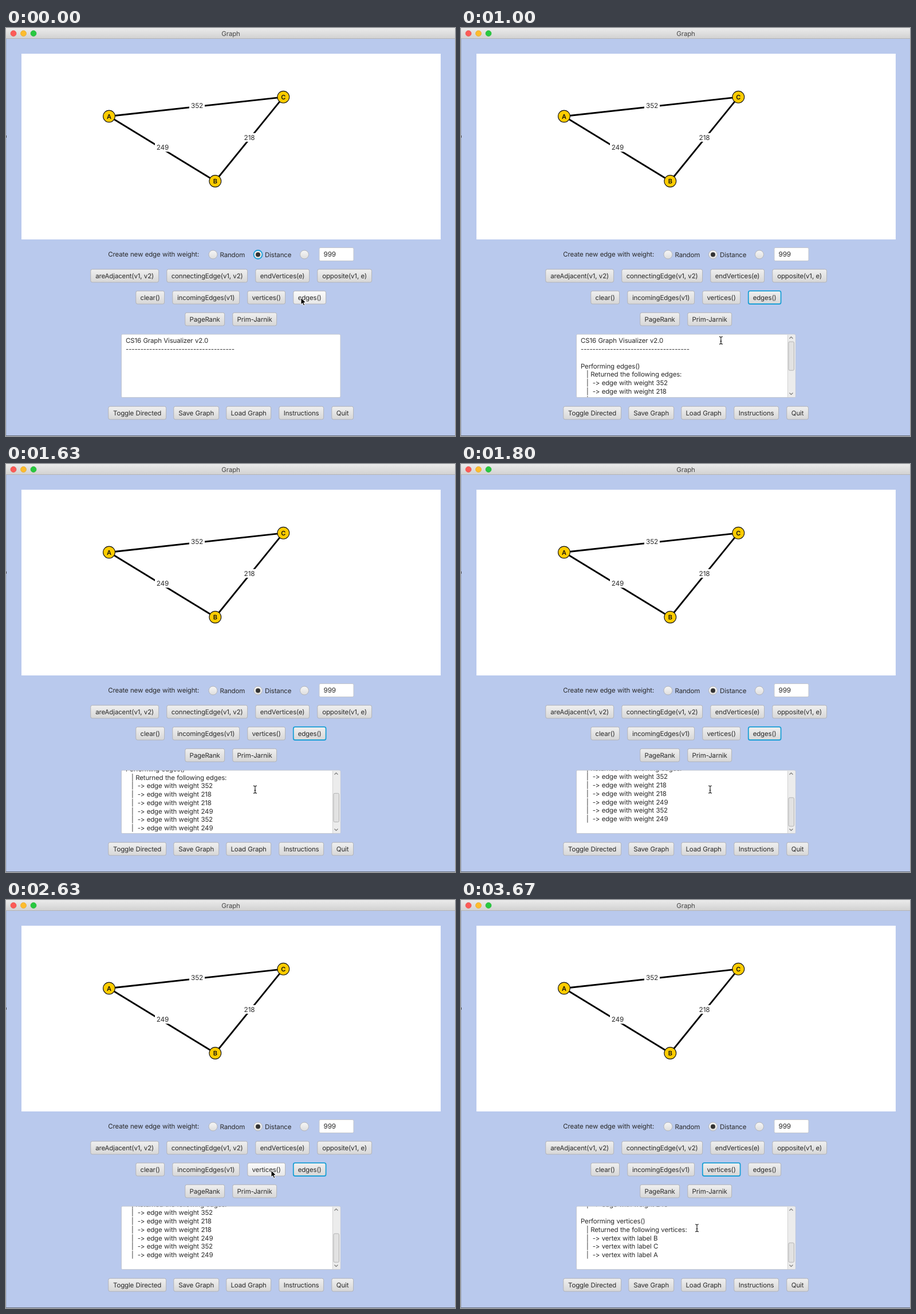
Animation of 784 by 714 pixels, one loop 3710 ms. Source, as an HTML page with a canvas:

```html
<!DOCTYPE html>
<html lang="en">
<head>
<meta charset="utf-8">
<title>Graph</title>
<style>
  html, body { margin: 0; width: 100%; height: 100%; overflow: hidden; background: #b9c9ed; }
  canvas { display: block; }
</style>
</head>
<body>
<canvas id="stage" width="784" height="714"></canvas>
<script>
const ctx = document.getElementById('stage').getContext('2d');
const LOOP = 3710, LINE = 14.75, INK = '#2a2a2a', FOCUS = '#1a9fd6';
const FIRST_PRESS = 370, FIRST_OUTPUT = 430, SECOND_PRESS = 2870, SECOND_OUTPUT = 2930;

// label, left, right, top
const buttons = [
  ['areAdjacent(v1, v2)', 148, 267, 422], ['connectingEdge(v1, v2)', 281, 422, 422],
  ['endVertices(e)', 436, 530, 422], ['opposite(v1, e)', 544, 639, 422],
  ['clear()', 227, 277, 460], ['incomingEdges(v1)', 291, 408, 460],
  ['vertices()', 422, 488, 460], ['edges()', 502, 559, 460],
  ['PageRank', 313, 382, 498], ['Prim-Jarnik', 396, 473, 498],
  ['Toggle Directed', 179, 280, 662], ['Save Graph', 293, 372, 662],
  ['Load Graph', 385, 463, 662], ['Instructions', 477, 555, 662], ['Quit', 569, 607, 662]
];
const nodes = { A: [180, 154.5], B: [365.3, 268], C: [484.3, 120.8] };
// ends, weight, label centre
const edges = [['A', 'C', 352, 333.5, 135.5], ['A', 'B', 249, 273.5, 209], ['B', 'C', 218, 425, 191.5]];

const header = ['CS16 Graph Visualizer v2.0', '-'.repeat(37)];
const report = (call, kind, items) => ['', `Performing ${call}()`, `   | Returned the following ${call}:`,
  ...items.map(item => `   |  -> ${kind} ${item}`)];
const edgeReport = report('edges', 'edge with weight', [352, 218, 218, 249, 352, 249]);
const vertexReport = report('vertices', 'vertex with label', ['B', 'C', 'A']);

// time, x, y of the pointer
const path = [
  [200, 515, 472], [480, 511.5, 474.5], [700, 511.5, 474.5], [1150, 434, 571.5], [1330, 434, 571.5],
  [1700, 435, 569.5], [2300, 435, 569.5], [2600, 463, 473], [2760, 463, 473], [2920, 459, 470],
  [3040, 459, 470], [3420, 412, 574]
];

const clamp = v => Math.min(1, Math.max(0, v));
const ease = u => u * u * (3 - 2 * u);

function pointerAt(t) {
  const next = path.findIndex(key => key[0] > t);
  if (next < 1) return (next ? path[path.length - 1] : path[0]).slice(1);
  const [t0, x0, y0] = path[next - 1], [t1, x1, y1] = path[next];
  const u = ease((t - t0) / (t1 - t0));
  return [x0 + (x1 - x0) * u, y0 + (y1 - y0) * u];
}

function shade(y0, y1, top, bottom) {
  const g = ctx.createLinearGradient(0, y0, 0, y1);
  g.addColorStop(0, top);
  g.addColorStop(1, bottom);
  return g;
}

function rect(x, y, w, h, fill) {
  ctx.fillStyle = fill;
  ctx.fillRect(x, y, w, h);
}

function box(x, y, w, h, radius, fill, stroke, width = 1) {
  ctx.beginPath();
  ctx.roundRect(x, y, w, h, radius);
  paint(fill, stroke, width);
}

function disc(x, y, r, fill, stroke, width = 1) {
  ctx.beginPath();
  ctx.arc(x, y, r, 0, 7);
  paint(fill, stroke, width);
}

function paint(fill, stroke, width = 1) {
  if (fill) { ctx.fillStyle = fill; ctx.fill(); }
  if (stroke) { ctx.strokeStyle = stroke; ctx.lineWidth = width; ctx.stroke(); }
}

function line(points, color, width) {
  ctx.beginPath();
  points.forEach(([x, y]) => ctx.lineTo(x, y));
  paint(null, color, width);
}

function text(str, x, baseline, align = 'left', font = '11.5px', color = INK) {
  ctx.font = `${font} Inter, sans-serif`;
  ctx.textAlign = align;
  ctx.fillStyle = color;
  ctx.fillText(str, x, baseline);
}

function drawWindow() {
  rect(0, 0, 784, 714, '#b9c9ed');
  rect(0, 0, 784, 18, shade(0, 18, '#ebebeb', '#d2d2d2'));
  rect(0, 18, 784, 1, '#b3b3b5');
  rect(0, 19, 1, 695, '#a5b1cf');
  rect(0, 188, 1, 4, '#444');
  rect(0, 713, 784, 1, '#666c7a');
  disc(13, 9.5, 5, '#fc5b57', '#e2463f', 0.6);
  disc(30.5, 9.5, 5, '#fdbc2e', '#dfa023', 0.6);
  disc(48, 9.5, 5, '#28c840', '#1dad2b', 0.6);
  text('Graph', 392.5, 14, 'center', '11.5px', '#464646');
}

function drawGraph() {
  rect(27, 45, 732, 325, '#fff');
  for (const [from, to] of edges) line([nodes[from], nodes[to]], '#000', 2.8);
  for (const [, , weight, x, y] of edges) {
    rect(x - 13.5, y - 7.5, 27, 15, '#fff');
    text(weight, x, y + 4.3, 'center', '11.8px');
  }
  for (const [name, [x, y]] of Object.entries(nodes)) {
    disc(x, y, 10.4, '#ffcc00', '#111', 1.1);
    text(name, x, y + 4, 'center', '600 11px', '#111');
  }
}

function drawRadio(x, label, selected, focused) {
  disc(x, 396.5, 7.5, shade(389, 404, '#f6f6f6', '#dedede'), focused ? FOCUS : '#b2b4ba', focused ? 1.8 : 1);
  if (selected) disc(x, 396.5, 4, '#333');
  text(label, x + 12, 400.5);
}

function drawOptions(t) {
  text('Create new edge with weight:', 178.3, 400);
  drawRadio(361.5, 'Random');
  drawRadio(440, 'Distance', true, t < FIRST_PRESS);
  drawRadio(521, '');
  box(547, 384.5, 60, 23, 2, '#fff', '#c3c6cd');
  text('999', 554.5, 400.3, 'left', '11.8px');
}

function drawButtons(t, [px, py]) {
  const focus = t >= SECOND_PRESS ? 'vertices()' : t >= FIRST_PRESS ? 'edges()' : '';
  for (const [label, left, right, top] of buttons) {
    const hover = px > left && px < right && py > top && py < top + 23;
    const fill = hover ? shade(top, top + 23, '#fbfbfb', '#e7e7e7') : shade(top, top + 23, '#f0f0f0', '#d7d7d7');
    const focused = label === focus;
    box(left - 0.2, top + 0.2, right - left - 0.2, 22.8, 3, fill, focused ? FOCUS : '#b1b3b9', focused ? 1.8 : 1);
    text(label, (left + right) / 2 - 0.4, top + 15.8, 'center');
  }
}

function drawConsole(t) {
  const lines = [...header, ...(t >= FIRST_OUTPUT ? edgeReport : []), ...(t >= SECOND_OUTPUT ? vertexReport : [])];
  const bottom = (lines.length - 6) * LINE;
  const scroll = t >= SECOND_OUTPUT ? bottom : bottom * clamp((t - 1200) / 550);

  box(201.5, 536, 382.5, 110.5, 2, '#fff', '#c3c7d0');
  ctx.save();
  ctx.beginPath();
  ctx.rect(202, 536.5, 368, 109.5);
  ctx.clip();
  lines.forEach((str, i) => text(str, 209, 551.4 + i * LINE - scroll));
  ctx.restore();
  if (t < FIRST_OUTPUT) return;

  const thumb = 86 * 109 / ((lines.length + 1) * LINE + 10);
  const y = 549 + (85 - thumb) * scroll / bottom;
  rect(570, 537, 13.5, 109, '#ececec');
  rect(570, 537, 1, 109, '#d2d2d2');
  box(572, y, 9.5, thumb, 2, '#e2e2e2', '#b4b4b4');
  line([[573.5, 543.5], [576.5, 540.5], [579.5, 543.5]], '#777', 1.1);
  line([[573.5, 638.5], [576.5, 641.5], [579.5, 638.5]], '#777', 1.1);
}

function drawPointer([x, y]) {
  ctx.save();
  ctx.translate(x, y);
  if (x > 202 && x < 570 && y > 536 && y < 647) {
    ctx.beginPath();
    for (const s of [-1, 1]) {
      ctx.moveTo(-3, 6.5 * s);
      ctx.quadraticCurveTo(0, 6.5 * s, 0, 4.5 * s);
      ctx.quadraticCurveTo(0, 6.5 * s, 3, 6.5 * s);
    }
    ctx.moveTo(0, -5);
    ctx.lineTo(0, 5);
    ctx.moveTo(-1.5, 1.5);
    ctx.lineTo(1.5, 1.5);
    paint(null, '#222', 1.2);
  } else {
    ctx.beginPath();
    [[0, 0], [0, 12], [2.7, 9.5], [4.8, 14], [6.8, 13.1], [4.9, 8.8], [8.6, 8.5]].forEach(p => ctx.lineTo(...p));
    ctx.closePath();
    paint('#000', '#fff', 1);
  }
  ctx.restore();
}

function draw() {
  const t = performance.now() % LOOP;
  const pointer = pointerAt(t);
  ctx.textRendering = 'geometricPrecision';
  ctx.letterSpacing = '-0.16px';
  ctx.wordSpacing = '0.4px';
  drawWindow();
  drawGraph();
  drawOptions(t);
  drawButtons(t, pointer);
  drawConsole(t);
  drawPointer(pointer);
  requestAnimationFrame(draw);
}
draw();
</script>
</body>
</html>
```
